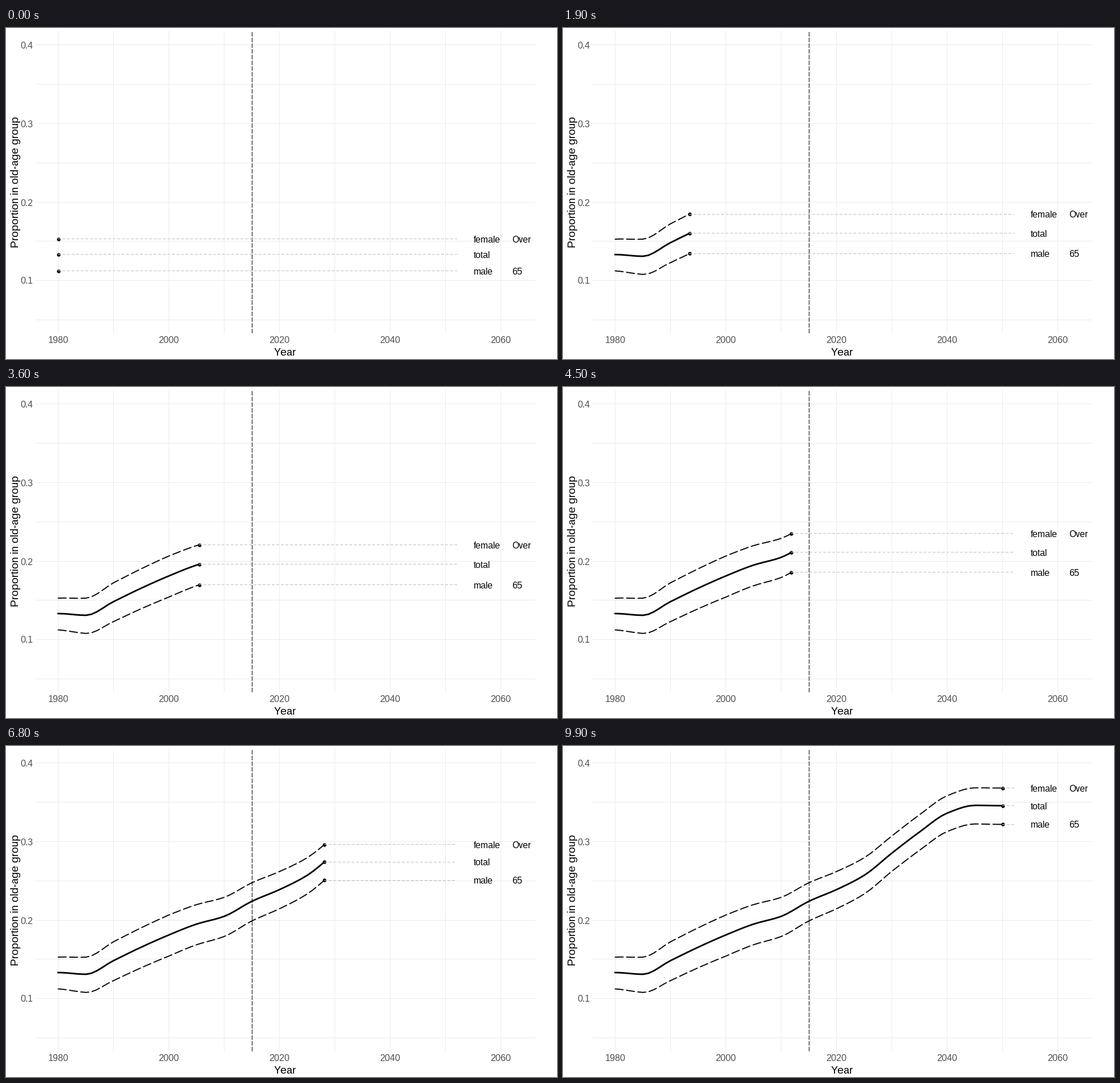
Animation, 966 px wide and 580 px high, one loop 10 s. Source, as a matplotlib script:

```python
import numpy as np
import matplotlib.pyplot as plt
from matplotlib.animation import FuncAnimation

W, H, FRAMES = 966, 580, 100
LEFT, RIGHT, TOP, BOTTOM = 52, 927, 5, 534
START, END, STEP = 1980, 2050, 5
GUIDE_END = 790

plt.rcParams.update({
    "font.family": "Liberation Sans",
    "text.hinting": "native",
    "text.hinting_factor": 1,
    "text.kerning_factor": 6,
    "lines.scale_dashes": False,
})

# Share of the total population aged over 65, one key point per STEP years
KEYS = np.array([.1332, .1310, .1484, .1655, .1811, .1949, .2048, .2240,
                 .2389, .2571, .2854, .3123, .3363, .3461, .3457])
RISE = np.diff(KEYS)


def key_slopes():
    """Harmonic mean of neighbouring rises, flat at turning points."""
    a, b = RISE[:-1], RISE[1:]
    inner = np.where(a * b > 0, 2 * a * b / (a + b), 0)
    return np.concatenate([[0], inner, [0]])


SLOPES = key_slopes()


def total(year):
    pos = (np.asarray(year) - START) / STEP
    k = np.clip(pos.astype(int), 0, len(RISE) - 1)
    t = pos - k
    return (KEYS[k] + RISE[k] * t * t * (3 - 2 * t)
            + SLOPES[k] * t * (1 - t) ** 2 - SLOPES[k + 1] * t * t * (1 - t))


def gap(year):
    return np.interp(year, [1980, 1990, 2000, 2030, 2050],
                     [.0196, .0240, .0254, .0218, .0225])


def px(year):
    return 91 + (year - START) * 9.705


def py(share):
    return 29.35 + (0.4 - share) * 1376


def pixel(v):
    return np.floor(v + 0.5)


fig = plt.figure(figsize=(W / 72, H / 72), dpi=72, facecolor="white")
ax = fig.add_axes([0, 0, 1, 1])
ax.set_xlim(-0.5, W - 0.5)
ax.set_ylim(H - 0.5, -0.5)
ax.axis("off")


def line(xs, ys, color, width=1, dash="-", cap="projecting", z=2):
    return ax.plot(xs, ys, color=color, lw=width, ls=dash, zorder=z,
                   snap=False, dash_capstyle=cap)[0]


def text(x, y, s, size=16, color="black", **kw):
    return ax.text(x, y, s, fontsize=size, color=color, va="baseline",
                   zorder=6, **kw)


# Grid, ticks and titles
for year in range(1980, 2061, 10):
    x = pixel(px(year))
    line([x, x], [TOP, BOTTOM], "#ebebeb", z=1)
    if year % 20 == 0:
        text(x, 552, str(year), color="#4d4d4d", ha="center")
for k in range(1, 9):
    y = pixel(py(k / 20))
    line([LEFT, RIGHT], [y, y], "#ebebeb", z=1)
    if k % 2 == 0:
        text(46.5, y + 6, f"{k / 20:.1f}", color="#4d4d4d", ha="right")
text(489, 573, "Year", 19, ha="center")
text(22, 269.5, "Proportion in old-age group", 19, ha="center",
     rotation=90, rotation_mode="anchor")
x = pixel(px(2015))
line([x, x], [BOTTOM, TOP], "black", dash=(0, (7, 3)))


class Series:
    def __init__(self, name, offset, group=""):
        self.offset = offset
        if offset:
            self.curve = line([], [], "black", 1.9, (0, (14, 6)), "round", 3)
        else:
            self.curve = line([], [], "black", 2.8, z=3)
        self.dot = ax.plot([], [], "o", ms=6.4, mew=0, color="black",
                           zorder=4)[0]
        self.guide = line([], [], "#bebebe", dash=(0, (4, 4)), z=5)
        self.labels = [text(819, 0, name), text(887, 0, group)]

    def height(self, year):
        return py(total(year) + self.offset * gap(year))

    def reveal(self, now):
        years = np.append(np.arange(START, now), now)
        x, y = px(now), self.height(now)
        self.curve.set_data(px(years), self.height(years))
        self.dot.set_data([x], [y])
        self.guide.set_data([pixel(x), GUIDE_END], [pixel(y)] * 2)
        for label in self.labels:
            label.set_y(y + 6)


series = [Series("female", 1, "Over"), Series("total", 0),
          Series("male", -1.06, "65")]


def update(i):
    for s in series:
        s.reveal(START + (END - START) * i / (FRAMES - 1))
    return []


anim = FuncAnimation(fig, update, frames=FRAMES, interval=100, repeat=True,
                     repeat_delay=0, blit=False)
plt.show()
```
